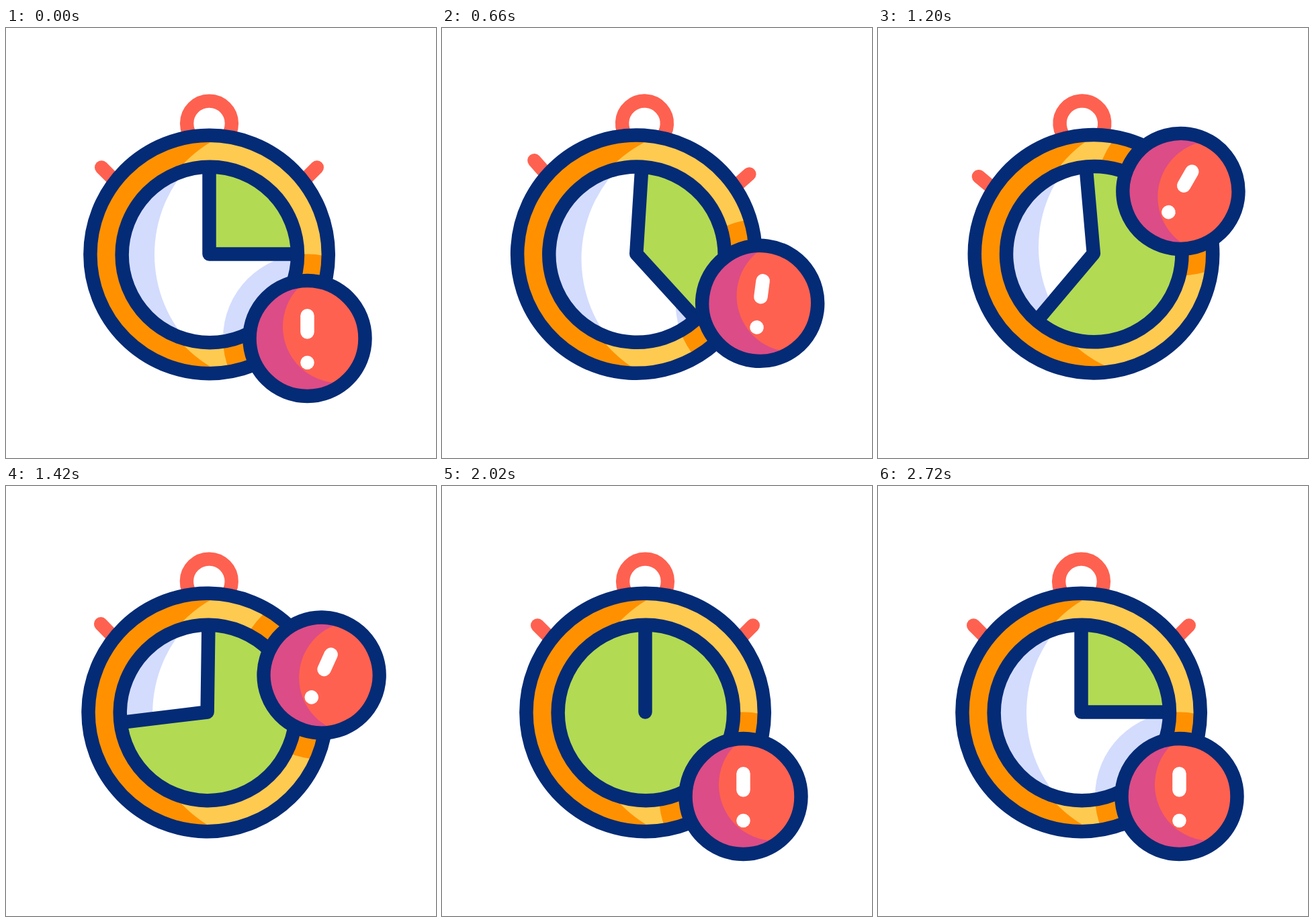
These frames come from a looping animation (640x640 px, 2820 ms). An HTML page:

```html
<!DOCTYPE html>
<html lang="en">
<head>
<meta charset="utf-8">
<title>Stopwatch alert</title>
<style>
  html, body { margin: 0; width: 100%; height: 100%; overflow: hidden; background: #fff; }
  svg { display: block; width: 100vw; height: 100vh; }
  .line { fill: none; stroke: #042b76; stroke-width: 20.5; stroke-linecap: round; stroke-linejoin: round; }
  .knob { fill: none; stroke: #ff6150; stroke-width: 20.4; stroke-linecap: round; }
</style>
</head>
<body>
<svg viewBox="0 0 640 640">
  <defs>
    <clipPath id="ringClip"><circle cx="302.6" cy="337" r="177"/></clipPath>
    <clipPath id="faceClip"><circle cx="302.6" cy="337" r="131"/></clipPath>
    <clipPath id="badgeClip"><circle r="86"/></clipPath>
  </defs>
  <g id="clock">
    <path id="earL" class="knob" d="M142.2 207.5L172 237.3"/>
    <path id="earR" class="knob" d="M462.8 207.5L433 237.3"/>
    <circle class="knob" cx="302.5" cy="142" r="33.4"/>
    <g clip-path="url(#ringClip)">
      <circle cx="302.6" cy="337" r="177" fill="#ff9100"/>
      <circle cx="405" cy="337" r="195" fill="#ffca50"/>
      <circle class="shade" r="125.5" fill="#ff9100"/>
    </g>
    <circle class="line" cx="302.6" cy="337" r="177.2"/>
    <g clip-path="url(#faceClip)">
      <circle cx="302.6" cy="337" r="131" fill="#d3dcfd"/>
      <circle cx="415.5" cy="337" r="194.5" fill="#fff"/>
      <circle class="shade" r="125.5" fill="#d3dcfd"/>
    </g>
    <path id="wedge" fill="#b2da53"/>
    <path id="hands" class="line"/>
    <circle class="line" cx="303.3" cy="337.5" r="130.7"/>
  </g>
  <g id="badge">
    <g clip-path="url(#badgeClip)">
      <circle r="86" fill="#dc4c86"/>
      <circle cx="47.1" cy="-17.5" r="83.6" fill="#ff6150"/>
    </g>
    <circle class="line" r="86"/>
    <path d="M0 -33.8V-9.6" stroke="#fff" stroke-width="20.5" stroke-linecap="round"/>
    <circle cy="36" r="10.3" fill="#fff"/>
  </g>
</svg>
<script>
const LOOP = 2820, RAD = Math.PI / 180;
const PIVOT = { x: 302.5, y: 126 };
const HUB = { x: 302.5, y: 336.5 };
const $ = id => document.getElementById(id);
const shades = document.querySelectorAll('.shade');

const span = (t, a, b) => Math.min(1, Math.max(0, (t - a) / (b - a)));
const ease = p => p * p * (3 - 2 * p);
const mix = (a, b, p) => a + (b - a) * p;
const polar = (c, r, deg) => ({ x: c.x + r * Math.cos(deg * RAD), y: c.y + r * Math.sin(deg * RAD) });
const put = (id, name, value) => $(id).setAttribute(name, value);

// Swings 0, 5, -5, 5, 0 degrees, mirrored around 1200 ms.
function leanAt(m) {
  return m < 800 ? 5 * ease(span(m, 400, 800)) : mix(5, -5, ease(span(m, 800, 1200)));
}

function handAt(t) {
  return t < 2400 ? mix(90, 360, span(t, 400, 2000)) : mix(360, 90, ease(span(t, 2400, 2720)));
}

function pressAt(t) {
  return 8 * (Math.sin(Math.PI * span(t, 200, 400)) ** 2 + Math.sin(Math.PI * span(t, 2400, 2720)) ** 2);
}

function draw(t) {
  const m = 1200 - Math.abs(t - 1200);
  const lean = leanAt(m);
  put('clock', 'transform', `rotate(${lean} ${PIVOT.x} ${PIVOT.y})`);

  const k = pressAt(t);
  put('earL', 'transform', `translate(${k} ${k})`);
  put('earR', 'transform', `translate(${-k} ${k})`);

  const a = handAt(t);
  const tip = polar(HUB, 128, a - 90);
  const top = HUB.y - 128;
  // Stop just short of a full turn so the arc stays defined.
  const edge = polar(HUB, 128, Math.min(a, 359.99) - 90);
  put('wedge', 'd', `M${HUB.x} ${HUB.y}V${top}A128 128 0 ${a > 180 ? 1 : 0} 1 ${edge.x} ${edge.y}Z`);
  put('hands', 'd', `M${HUB.x} ${top}V${HUB.y}L${tip.x} ${tip.y}`);

  const p = ease(span(m, 400, 1200));
  const pos = polar({ x: 281.4, y: 351 }, 200.6, mix(33.6, -32.6, p));
  put('badge', 'transform', `translate(${pos.x} ${pos.y}) rotate(${30 * p})`);

  // The badge's shade, expressed in the leaning clock's own space.
  const dx = pos.x - PIVOT.x, dy = pos.y - PIVOT.y;
  const c = Math.cos(lean * RAD), s = Math.sin(lean * RAD);
  for (const el of shades) {
    el.setAttribute('cx', PIVOT.x + dx * c + dy * s);
    el.setAttribute('cy', PIVOT.y + dy * c - dx * s);
  }
}

const start = performance.now();
function tick() {
  draw((performance.now() - start) % LOOP);
  requestAnimationFrame(tick);
}
draw(0);
requestAnimationFrame(tick);
</script>
</body>
</html>
```
